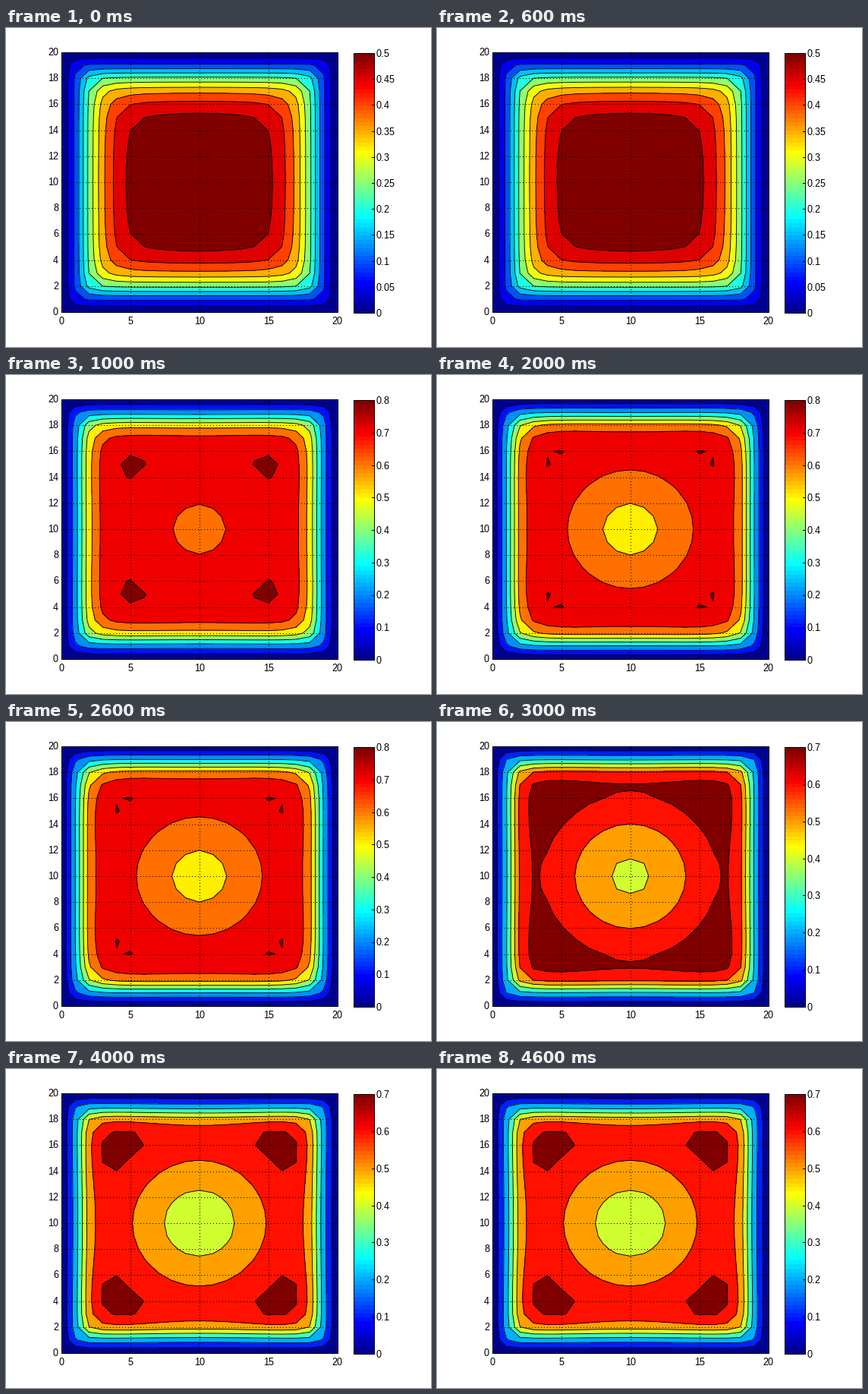
Recreate the animation shown at these times as a matplotlib script. Size 560 by 420 pixels, loop 5000 ms.

```python
import numpy as np
import matplotlib.pyplot as plt
from matplotlib.animation import ArtistAnimation
from matplotlib.lines import Line2D
from matplotlib.patches import Rectangle

plt.rcParams.update({
    "font.family": "Liberation Sans",
    "text.hinting": "native",
    "text.hinting_factor": 1,
})

W, H, DPI = 560, 420, 100
PX = 72 / DPI
PLOT = LEFT, RIGHT, TOP, BOTTOM = 73, 436.5, 32, 374
BAR = BAR_L, BAR_R, BAR_T, BAR_B = 458, 485, 33, 375
N = 20

fig = plt.figure(figsize=(W / DPI, H / DPI), dpi=DPI, facecolor="white")
ax = fig.add_axes([0, 0, 1, 1])
ax.set(xlim=(0, W), ylim=(H, 0))
ax.axis("off")

grid_x = np.linspace(LEFT, RIGHT, N + 1)
grid_y = np.linspace(BOTTOM, TOP, N + 1)


def jet(i):
    r, g, b = min(i - 23, 71 - i), min(i - 7, 55 - i), min(i + 9, 39 - i)
    return tuple(np.clip([r, g, b], 0, 16) / 16)


def field(low, high, width, steep, power, corner):
    """A core that dips from high to low at the centre and falls to 0 at the walls."""
    x, y = np.meshgrid(np.arange(N + 1.0), np.arange(N + 1.0))
    r2 = (x - N / 2) ** 2 + (y - N / 2) ** 2
    core = high - (high - low) * np.exp(-r2 / width ** 2)
    dx, dy = np.minimum(x, N - x), np.minimum(y, N - y)
    wall = dx * dy / (dx ** corner + dy ** corner + 1e-12) ** (1 / corner)
    return core * (1 - np.exp(-steep * wall ** power))


def line(x, y, z, style="-"):
    return ax.add_line(Line2D(x, y, color="black", lw=PX, ls=style, zorder=z,
                              antialiased=False, solid_capstyle="butt"))


def text(x, y, s, ha):
    return ax.text(x, y + 4, s, size=13 * PX, ha=ha, va="baseline")


def box(l, r, t, b):
    line([l, r, r, l, l], [t, t, b, b, t], 9)


def draw_static():
    for i, x in enumerate(grid_x):
        if i % 5 == 0:
            text(x, 386, str(i), "center")
            line([x, x], [TOP, BOTTOM], 7, (0, (1, 4)))
            line([x, x], [TOP, TOP + 4], 8)
            line([x, x], [BOTTOM - 4, BOTTOM], 8)
    for i, y in enumerate(grid_y):
        if i % 2 == 0:
            text(69, y, str(i), "right")
            line([LEFT, RIGHT], [y, y], 7, (0, (1, 4)))
            line([LEFT, LEFT + 4], [y, y], 8)
            line([RIGHT - 4, RIGHT], [y, y], 8)
    for i, y in enumerate(np.linspace(BAR_B, BAR_T, 65)[:-1]):
        ax.add_patch(Rectangle((BAR_L, BAR_T), BAR_R - BAR_L, y - BAR_T,
                               fc=jet(i), lw=0, antialiased=False))
    box(*PLOT)
    box(*BAR)


def draw_scene(step, bands, *shape):
    u = field(*shape)
    levels = step * np.arange(bands + 1)
    colors = [jet(min(63, 64 * k // bands)) for k in range(bands + 1)]
    arts = [
        ax.contourf(grid_x, grid_y, u, levels, colors=colors, extend="max",
                    antialiased=False, zorder=2),
        ax.contour(grid_x, grid_y, u, levels[1:], colors="black",
                   linewidths=0.9 * PX, zorder=3),
    ]
    for v, y in zip(levels, np.linspace(BAR_B, BAR_T, bands + 1)):
        arts.append(text(488, y + 1, f"{v:.2g}", "left"))
        arts.append(line([BAR_R - 3, BAR_R], [y, y], 8))
    return arts


# level step, bands, low, high, width, steep, power, corner
scenes = [
    (0.05, 10, 0.555, 0.555, 7, 0.22, 1.55, 4),
    (0.1, 8, 0.682, 0.907, 6.7, 0.333, 1.7, 3),
    (0.1, 8, 0.57, 0.914, 6.61, 0.42, 1.84, 2),
    (0.1, 7, 0.483, 0.82, 6.16, 0.45, 1.93, 2.7),
    (0.1, 7, 0.45, 0.845, 7, 0.375, 1.85, 3.5),
]

draw_static()
anim = ArtistAnimation(fig, [draw_scene(*s) for s in scenes], interval=1000,
                       repeat=True, repeat_delay=0, blit=False)
plt.show()
```
